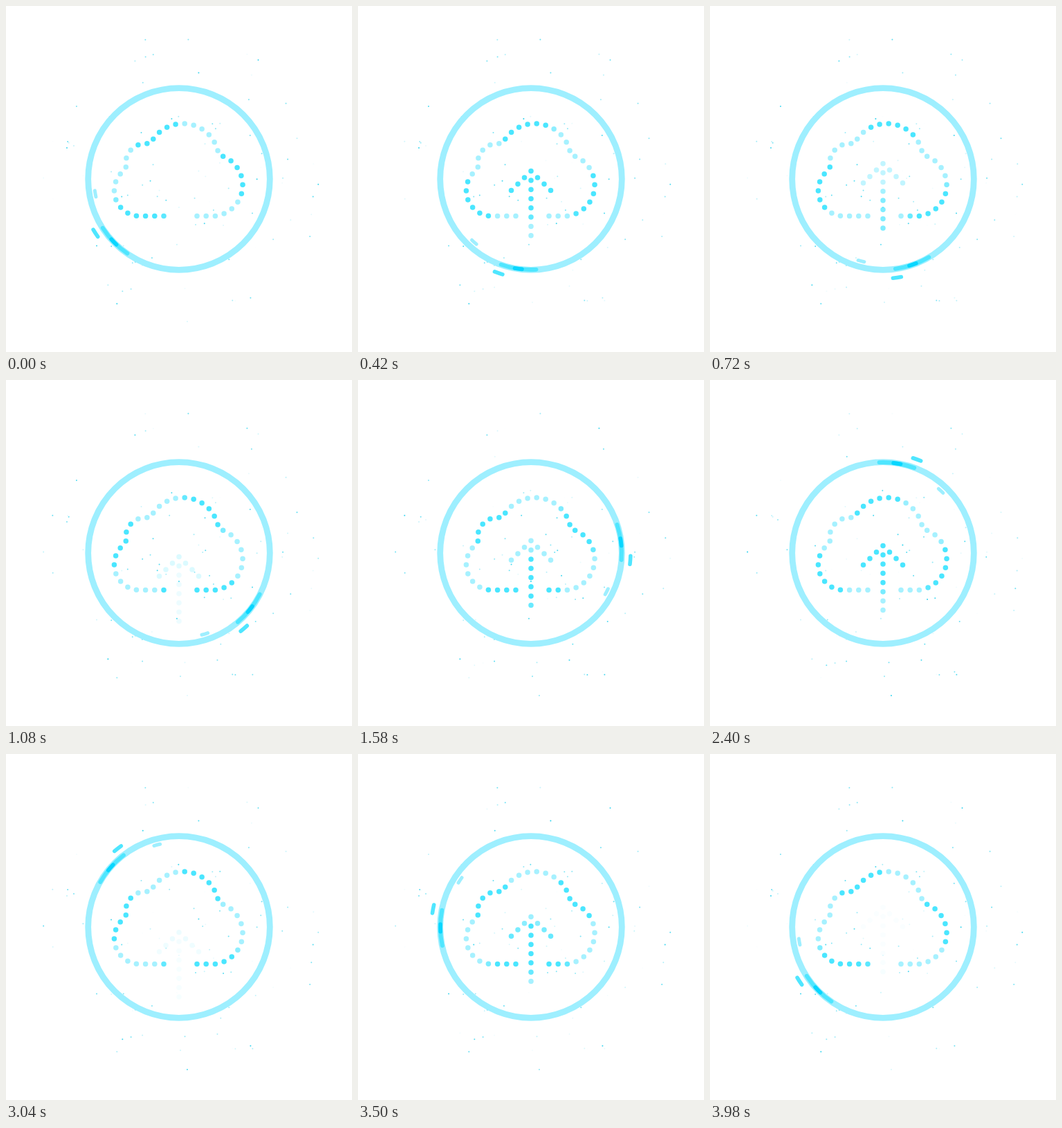
An HTML page with a canvas for the animation above (4 s loop, 500 px wide and 500 px high).

```html
<!DOCTYPE html>
<html lang="en">
<head>
<meta charset="utf-8">
<title>Cloud upload</title>
<style>
html, body { margin: 0; width: 100%; height: 100%; overflow: hidden; background: #fff; }
canvas { display: block; width: 500px; height: 500px; }
svg { position: absolute; width: 0; height: 0; }
</style>
</head>
<body>
<canvas id="stage" width="500" height="500"></canvas>
<svg aria-hidden="true">
  <path id="outline" d="M228 303.5 H190 A37 37 0 0 1 170 238 L173.5 234
    A29 29 0 0 1 208.5 199.5 A52.2 52.2 0 0 1 307.3 215.3
    A44.8 44.8 0 0 1 302 303.5 H276"/>
</svg>
<script>
const ctx = document.getElementById('stage').getContext('2d');
const LOOP = 4000, TURN = 3980, TAU = Math.PI * 2;
const C = 250, BEADS = 37, SPARKS = 95;
const PALE = '#9eefff', MID = '#4fe6ff', STRONG = '#08d6ff', SPARK = '#10cdec';

const clamp = v => Math.max(0, Math.min(1, v));
const mod = (v, n) => ((v % n) + n) % n;

let seed = 41;
function rand() {
  seed = (seed * 16807) % 2147483647;
  return seed / 2147483647;
}

// Beads spread evenly along the cloud outline
const outline = document.getElementById('outline');
const step = outline.getTotalLength() / (BEADS - 1);
const cloud = Array.from({ length: BEADS }, (_, i) => outline.getPointAtLength(i * step));

const sparks = Array.from({ length: SPARKS }, () => {
  const a = rand() * TAU, r = 25 + 185 * Math.pow(rand(), 0.8);
  return { x: C + r * Math.cos(a), y: C + r * Math.sin(a), peak: rand(), power: 0.25 + 0.2 * rand() };
});

function dot(x, y, r, color, alpha = 1) {
  ctx.globalAlpha = alpha;
  ctx.fillStyle = color;
  ctx.beginPath();
  ctx.arc(x, y, r, 0, TAU);
  ctx.fill();
}

function arc(r, mid, half, width, color) {
  const a = mid * Math.PI / 180, h = half * Math.PI / 180;
  ctx.globalAlpha = 1;
  ctx.strokeStyle = color;
  ctx.lineWidth = width;
  ctx.lineCap = 'round';
  ctx.beginPath();
  ctx.arc(C, C, r, a - h, a + h);
  ctx.stroke();
}

// Bead colour runs from pale to bright with its glow
function bead(x, y, glow, alpha = 1) {
  const mix = (a, b) => Math.round(a + (b - a) * glow);
  dot(x, y, 3.75, `rgb(${mix(166, 74)},${mix(241, 230)},255)`, alpha);
}

function drawSparks(p) {
  for (const s of sparks) {
    dot(s.x, s.y, 1, SPARK, s.power * (1 + Math.cos(TAU * (p - s.peak))));
  }
}

function drawRing(p) {
  const a = 136 - 360 * p;
  arc(131.3, 0, 180, 8.8, PALE);
  arc(131, a, 11.3, 5.8, MID);
  arc(131, a, 2.3, 5.6, STRONG);
  arc(143.9, a + 11, 2.4, 5.6, MID);
  arc(122.8, a + 34, 2.1, 5, PALE);
}

// Three bright stretches travel along the outline
function drawCloud(p) {
  const period = BEADS / 3, start = 2 * period * p - 0.2;
  cloud.forEach(({ x, y }, i) => {
    const d = mod(i - start + 0.5, period) - 0.5;
    bead(x, y, clamp(d * 3 + 0.2) * clamp((6.4 - d) * 2));
  });
}

function drawArrow(u) {
  const alpha = clamp(Math.min(u, 1 - u) / 0.4);
  if (!alpha) return;
  const top = 260.2 - 39 * u * (1.55 - 0.55 * u);
  const start = 12 * u - 5.3;
  const glow = i => clamp(i - start + 0.8) * clamp(start + 6 - i);
  for (let i = 0; i < 8; i++) bead(C, top + 13.3 * i, glow(i), alpha);
  for (let i = 1; i < 4; i++) {
    for (const side of [-1, 1]) {
      bead(C + side * 9.5 * i, top + 9.3 * i, glow(i * 0.2), alpha);
    }
  }
}

function draw(now) {
  const t = now % LOOP, p = Math.min(1, t / TURN);
  ctx.globalAlpha = 1;
  ctx.fillStyle = '#fff';
  ctx.fillRect(0, 0, 500, 500);
  drawSparks(p);
  drawRing(p);
  drawCloud(p);
  drawArrow((t % 1000) / 1000);
}

let origin = null;
function tick(now) {
  if (origin === null) origin = now;
  draw(now - origin);
  requestAnimationFrame(tick);
}
draw(0);
requestAnimationFrame(tick);
</script>
</body>
</html>
```
